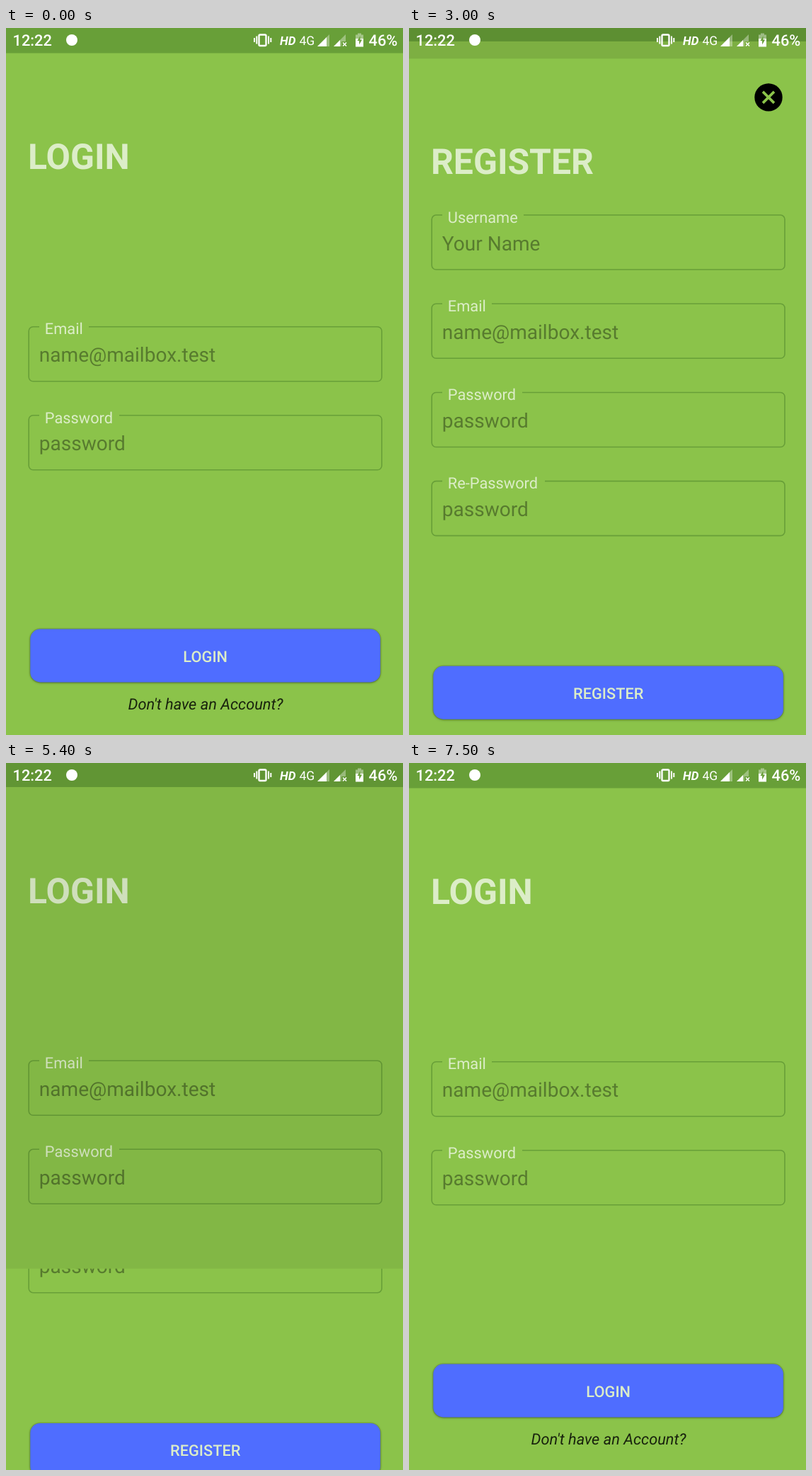
Write an HTML page that moves like this. It is 561x998 px and loops after 8800 ms.

```html
<!DOCTYPE html>
<html lang="en">
<head>
<meta charset="utf-8">
<style>
  html, body { margin: 0; width: 100%; height: 100%; overflow: hidden; background: #000; }
  svg { display: block; width: 561px; height: 998px; font: 21.8px Roboto, sans-serif; text-rendering: geometricPrecision; }
  .title { font-size: 49.9px; font-weight: 700; }
  .light { fill: #dcedc8; }
  .hint { font-size: 28.05px; fill: #000; fill-opacity: .37; }
  .outline { fill: none; stroke: #689f38; stroke-width: 1.6; }
  .button { fill: #4f6dff; filter: drop-shadow(0 0 .8px rgba(0, 0, 0, .35)) drop-shadow(0 1.5px 1.5px rgba(0, 0, 0, .3)); }
  .mid { text-anchor: middle; font-weight: 500; }
  .status { fill: #fff; }
  .status text { font-weight: 500; }
</style>
</head>
<body>
<svg viewBox="0 0 561 998">
  <defs><clipPath id="clip"><rect id="reveal" width="561" height="998"/></clipPath></defs>
  <g id="login"></g>
  <g id="register" clip-path="url(#clip)"></g>
  <g class="status">
    <text x="9.5" y="25">12:22</text>
    <circle cx="93" cy="17" r="8"/>
    <rect x="357.5" y="9.5" width="10" height="15.5" rx="1.5" fill="none" stroke="#fff" stroke-width="2.4"/>
    <path d="M351 14v6M354.3 11.5v11M371 11.5v11M374.3 14v6" stroke="#fff" stroke-width="2"/>
    <text x="387" y="23.5" style="font: italic 700 17px Roboto, sans-serif">HD</text>
    <text x="414.5" y="24" style="font: 17.5px Roboto, sans-serif">4G</text>
    <path d="M440 26L457 9V26ZM463 26L480 9V19H474V26Z" opacity=".35"/>
    <path d="M440 26L453 13V26ZM463 26L472 17V26Z"/>
    <path d="M476 20.5l5 5m0-5l-5 5" stroke="#fff" stroke-width="1.6"/>
    <path d="M494 9.5h3V7.5h5v2h3V15h-11z" opacity=".4"/>
    <path d="M494 15h11v11.5h-11z"/>
    <path d="M500.5 11l-4 7h2.6v5.5l4-7h-2.6z" fill="#689f38"/>
    <text x="512.5" y="25">46%</text>
  </g>
</svg>
<script>
const W = 561, H = 998, LOOP = 8800, SLIDE = 425;
const $ = id => document.getElementById(id);

const field = (y, label, hint, notch) => `
  <path class="outline" d="M47 ${y}H38.2a6 6 0 0 0 -6 6v65a6 6 0 0 0 6 6H525a6 6 0 0 0 6 -6v-65a6 6 0 0 0 -6 -6H${notch}"/>
  <text class="light" x="54.8" y="${y + 10.7}">${label}</text>
  <text class="hint" x="46.8" y="${y + 49.6}">${hint}</text>`;

const screen = (title, buttonY, body) => `
  <rect width="${W}" height="${H}" fill="#8bc34a"/>
  <rect width="${W}" height="35.5" fill="#689f38"/>
  <text class="title light" x="31" y="199">${title}</text>
  ${body}
  <rect class="button" x="34.3" y="${buttonY}" width="494.6" height="74.8" rx="14"/>
  <text class="mid light" x="281.7" y="${buttonY + 46}">${title}</text>`;

const email = "name@mailbox.test";

$("login").innerHTML = screen("LOGIN", 848.6,
  field(421.7, "Email", email, 117) +
  field(546.8, "Password", "password", 160) +
  `<text x="282" y="962.3" text-anchor="middle" font-style="italic" fill="#18220d">Don't have an Account?</text>`);

$("register").innerHTML = screen("REGISTER", 894,
  field(257.2, "Username", "Your Name", 162) +
  field(382.4, "Email", email, 117) +
  field(507.6, "Password", "password", 160) +
  field(632.8, "Re-Password", "password", 192) +
  `<circle cx="508" cy="91" r="19.7"/>
   <path d="M500 83l16 16m0-16l-16 16" stroke="#8bc34a" stroke-width="3.6"/>
   <circle id="ripple" cx="509.5" fill="#fff" opacity=".25"/>`);

const bez = (u, a, b, c, d) => {
  const v = 1 - u;
  return v * v * v * a + 3 * v * v * u * b + 3 * v * u * u * c + u * u * u * d;
};

// y at x on a cubic whose points are given as [x...] and [y...]
function curve(x, xs, ys) {
  let lo = 0, hi = 1;
  for (let i = 0; i < 30; i++) {
    const u = (lo + hi) / 2;
    if (bez(u, ...xs) < x) lo = u; else hi = u;
  }
  return bez(lo, ...ys);
}

const slide = x => curve(x, [0, .4, .2, 1], [0, 0, 1, 1]);
const dimOut = x => curve(x, [0, .33, 1, 1], [0, 0, 1, 1]);
const wipe = x => x < 1 / 6
  ? curve(x, [0, .05, .1333, .1667], [0, 0, .06, .4])
  : curve(x, [.1667, .2083, .25, 1], [.4, .82, 1, 1]);

const visits = [
  { open: 2766, tap: 3970, close: 4069 },
  { open: 5333, tap: 6240, close: 6340 }
];

function draw(t) {
  const visit = visits.find(v => t >= v.open && t < v.close + SLIDE);
  // shown: how far the sheet has risen; cut: hidden share of it from the top
  let shown = 0, cut = 1, alpha = 1;
  if (visit) {
    const closing = t >= visit.close;
    const age = t - (closing ? visit.close : visit.open);
    const x = Math.min(1, age / SLIDE);
    shown = closing ? 1 - slide(x) : slide(x);
    cut = closing ? wipe(x) : 1 - wipe(x);
    alpha = closing ? .9 + .1 * dimOut(x) : 1 - .1 * Math.min(1, age / 117);

    const press = t - visit.tap;
    $("ripple").setAttribute("r", press < 0 ? 0 : Math.min(26, 17 + press * .07));
    $("ripple").setAttribute("cy", 91 + 7 * Math.max(0, 1 - press / 130));
  }
  $("login").setAttribute("transform", `translate(0 ${-.02 * H * shown})`);
  $("login").setAttribute("opacity", alpha);
  $("register").setAttribute("transform", `translate(0 ${.041 * H * (1 - shown)})`);
  $("register").setAttribute("visibility", visit ? "visible" : "hidden");
  $("reveal").setAttribute("y", cut * H);
}

const start = performance.now();
function tick() {
  // the picture advances ten times a second
  const t = (performance.now() - start) % LOOP;
  draw(Math.floor(t / 100) * 100);
  requestAnimationFrame(tick);
}
tick();
</script>
</body>
</html>
```
